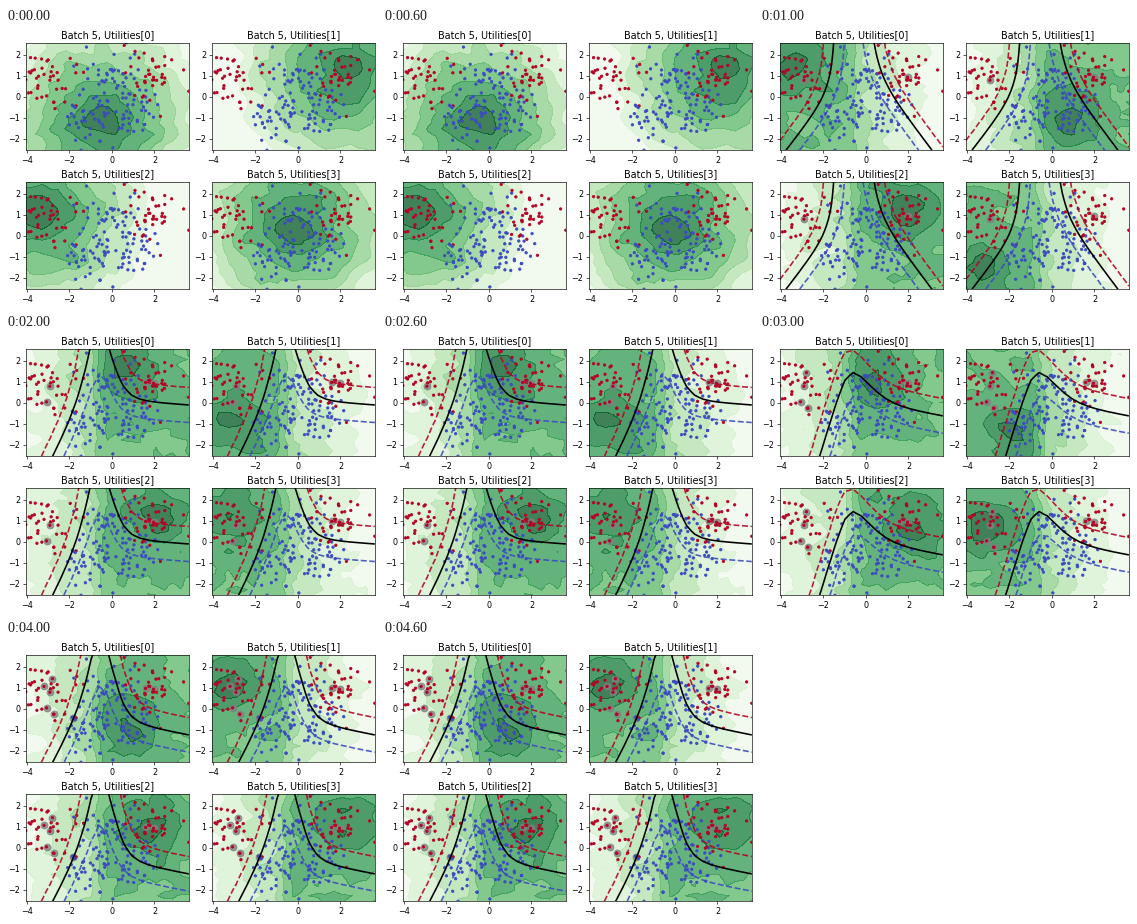
These frames come from a looping animation (371x278 px, 5000 ms). A matplotlib script:

```python
import numpy as np
import matplotlib.pyplot as plt
from matplotlib.animation import FuncAnimation

W, H, DPI = 371, 278, 58
LEFT, TOP, PW, PH = 19.8, 14.8, 163, 107.4
GAP_X, GAP_Y = 186, 139
RES, MID = 21, 93

# Five Gaussian blobs with alternating classes
rng = np.random.RandomState(0)
centers = [(0, 1), (-3, .5), (-1, -1), (2, 1), (1, -.5)]
pts = np.vstack([rng.normal(c, .7, (40, 2)) for c in centers])
cls = np.repeat(np.arange(5) % 2, 40)
lo, hi = pts.min(axis=0), pts.max(axis=0)

# The same grid in data units and in pixels of the first panel
X, Y = np.meshgrid(*(np.linspace(lo[i], hi[i], RES) for i in range(2)))
U, V = np.meshgrid(np.linspace(LEFT, LEFT + PW, RES),
                   np.linspace(TOP + PH, TOP, RES))

# Where the utility is highest: a row per batch, a point per panel
peaks = [
    [(95, 94), (153, 43), (35, 47), (104, 57)],
    [(38, 36), (122, 88), (147, 43), (38, 100)],
    [(118, 38), (40, 88), (150, 45), (40, 43)],
    [(112, 42), (65, 100), (148, 52), (38, 53)],
    [(122, 85), (38, 45), (142, 48), (152, 46)],
]

# Key points of the decision boundary, left and right branch
branches = [
    [[(27, 121), (72, 63), (74, 15)], [(113, 15), (116, 48), (171, 121)]],
    [[(48, 121), (77, 66), (84, 15)], [(104, 15), (116, 66), (183, 71)]],
    [[(60, 121), (82, 50)], [(89, 24), (118, 70), (183, 82)]],
    [[(48, 121), (79, 65), (86, 15)], [(104, 15), (118, 82), (183, 95)]],
]

# Queried samples in order, two added per batch
near = np.array([(44, 52), (149, 45), (41, 68), (142, 49),
                 (47, 40), (48, 74), (38, 46), (68, 78)])
near = lo + (near - (LEFT, TOP + PH)) / (PW, -PH) * (hi - lo)
picked = [np.hypot(*(pts - q).T).argmin() for q in near]


def bump(x, y, r):
    return np.exp(-((U - x) ** 2 + (V - y) ** 2) / r ** 2)


def noise(seed):
    n = np.random.RandomState(seed).normal(0, .25, (RES + 2, RES + 2))
    return sum(n[i:i + RES, j:j + RES] for i in range(3) for j in range(3)) / 3


def utility(batch, k):
    """Utility in colour bands: a cone at first, then a stepped plateau."""
    x, y = peaks[batch][k]
    if batch == 0:
        z = 7.9 - 7 * np.hypot(U - x, V - y) / 108
    else:
        d = np.sign(x - MID) * (U - MID)
        z = 3 + .03 * np.minimum(d, 0) + 1.6 / (1 + np.exp(-d / 2.5))
        z += .9 * bump(x, y, 70) + 1.9 * bump(x, y, 28)
    return np.clip(z + noise(10 * batch + k), .01, 7.99)


def half(p, q):
    """Log-odds of the half-plane right of p-q; flat lines fade wider."""
    dx, dy = np.subtract(q, p)
    size = np.hypot(dx, dy)
    width = 9.5 + 8 * (dx / size) ** 4
    return np.log(3) * ((V - p[1]) * dx - (U - p[0]) * dy) / size / width


def p_red(left, right):
    a, b = (np.logaddexp.reduce([half(p, q) for p, q in zip(c, c[1:])])
            for c in (left, right))
    return 1 / (1 + np.exp(-np.logaddexp(-a, -b)))


fig = plt.figure(figsize=((W + .01) / DPI, (H + .01) / DPI), dpi=DPI,
                 facecolor="white")
axes = []
for k in range(4):
    x = LEFT + GAP_X * (k % 2)
    y = TOP + GAP_Y * (k // 2)
    axes.append(fig.add_axes([x / W, 1 - (y + PH) / H, PW / W, PH / H]))


def draw_panel(ax, batch, k):
    ax.clear()
    ax.set_title(f"Batch 5, Utilities[{k}]", fontsize=12)
    ax.contourf(X, Y, utility(batch, k), levels=np.arange(9),
                cmap="Greens", alpha=.75)
    got = pts[picked[:2 * batch]]
    ax.scatter(got[:, 0], got[:, 1], c="grey", alpha=.8, marker=".", s=300)
    ax.scatter(pts[:, 0], pts[:, 1], c=cls, cmap="coolwarm", marker=".",
               zorder=2)
    if batch:
        prob = p_red(*branches[batch - 1])
        ax.contour(X, Y, prob, [.5], colors="k", linewidths=2)
        ax.contour(X, Y, prob, [.25, .75], cmap="coolwarm",
                   linestyles="--", linewidths=2, alpha=.9)
    ax.set_xticks(range(-4, 3, 2))
    ax.set_yticks(range(-2, 3))
    ax.set_xlim(lo[0], hi[0])
    ax.set_ylim(lo[1], hi[1])


def draw(batch):
    for k, ax in enumerate(axes):
        draw_panel(ax, batch, k)
    return axes


anim = FuncAnimation(fig, draw, frames=5, interval=1000,
                     init_func=lambda: draw(0), repeat=True, repeat_delay=0)
plt.show()
```
